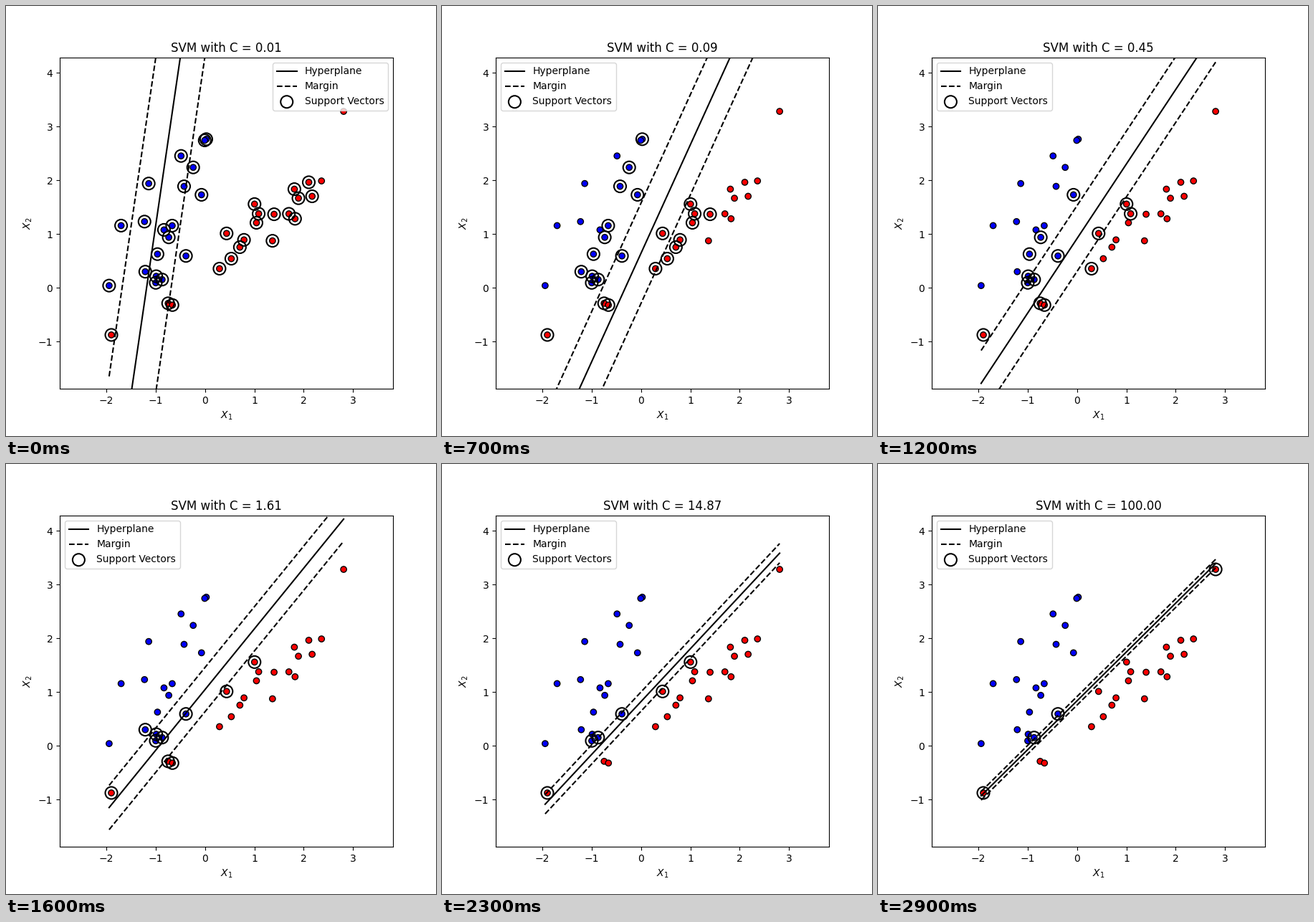
A matplotlib script for the animation above (3 s loop, 600 by 600 pixels).

```python
import numpy as np
import matplotlib.pyplot as plt
from matplotlib.animation import FuncAnimation

FRAMES = 30
C_VALUES = np.logspace(-2, 2, FRAMES)


def make_samples(per_class=20, flip=0.01, seed=42):
    """Two skewed Gaussian clouds on corners of a square, a few labels flipped."""
    rng = np.random.RandomState(seed)
    corners = rng.permutation(4)[:2]
    centers = 2.0 * np.column_stack([corners // 2, corners % 2]) - 1
    n = 2 * per_class
    points = rng.standard_normal(size=(n, 2))
    labels = np.repeat([0, 1], per_class)
    for k, center in enumerate(centers):
        skew = 2 * rng.uniform(size=(2, 2)) - 1
        points[labels == k] = points[labels == k] @ skew + center
    flipped = rng.uniform(size=n) < flip
    labels[flipped] = rng.randint(2, size=flipped.sum())
    order = np.arange(n)
    rng.shuffle(order)
    return points[order], 2.0 * labels[order] - 1


X, y = make_samples()
K = X @ X.T
DIAG = np.diag(K)


def movable(alpha, C):
    """Which multipliers may push the score up, which down, which are non-zero."""
    eps = 1e-9 * C
    above, below = alpha > eps, alpha < C - eps
    return np.where(y > 0, below, above), np.where(y > 0, above, below), above


def fit(C, alpha, tol=1e-4, max_iter=20000):
    """Linear soft-margin SVM, solved by sequential minimal optimisation."""
    alpha = alpha.copy()
    score = K @ (alpha * y)
    for _ in range(max_iter):
        up, low, _ = movable(alpha, C)
        resid = y - score
        i = np.argmax(np.where(up, resid, -np.inf))
        gap = resid[i] - resid
        if np.max(gap[low]) < tol:
            break
        curve = np.maximum(DIAG[i] + DIAG - 2 * K[i], 1e-12)
        j = np.argmax(np.where(low & (gap > 0), gap ** 2 / curve, -np.inf))
        room_i = C - alpha[i] if y[i] > 0 else alpha[i]
        room_j = alpha[j] if y[j] > 0 else C - alpha[j]
        step = min(gap[j] / curve[j], room_i, room_j)
        alpha[i] += y[i] * step
        alpha[j] -= y[j] * step
        score += step * (K[i] - K[j])
    up, low, support = movable(alpha, C)
    resid = y - score
    free = up & low
    if free.any():
        bias = resid[free].mean()
    else:
        bias = (resid[up].max() + resid[low].min()) / 2
    return alpha, (alpha * y) @ X, bias, support


def fit_all():
    models, alpha, last = [], np.zeros(len(y)), C_VALUES[0]
    for C in C_VALUES:
        alpha, w, bias, support = fit(C, alpha * C / last)
        models.append((w, bias, support))
        last = C
    return models


models = fit_all()
low_corner, high_corner = X.min(axis=0), X.max(axis=0)
xx = np.linspace(low_corner[0], high_corner[0])

fig, ax = plt.subplots(figsize=(6, 6), dpi=100)


def update(frame):
    w, bias, support = models[frame]
    yy = -(w[0] * xx + bias) / w[1]
    margin = 1 / np.linalg.norm(w)

    ax.clear()
    ax.scatter(X[:, 0], X[:, 1], c=y, cmap="bwr", edgecolors="k")
    ax.plot(xx, yy, "k-", label="Hyperplane")
    ax.plot(xx, yy - margin, "k--", label="Margin")
    ax.plot(xx, yy + margin, "k--")
    ax.scatter(X[support, 0], X[support, 1], s=150, facecolors="none",
               edgecolors="k", linewidths=1.5, label="Support Vectors")
    ax.set_xlim(low_corner[0] - 1, high_corner[0] + 1)
    ax.set_ylim(low_corner[1] - 1, high_corner[1] + 1)
    ax.set_title(f"SVM with C = {C_VALUES[frame]:.2f}")
    ax.set_xlabel("$X_1$")
    ax.set_ylabel("$X_2$")
    ax.legend(loc="best")


anim = FuncAnimation(fig, update, frames=FRAMES, interval=100, repeat=True)
plt.show()
```
